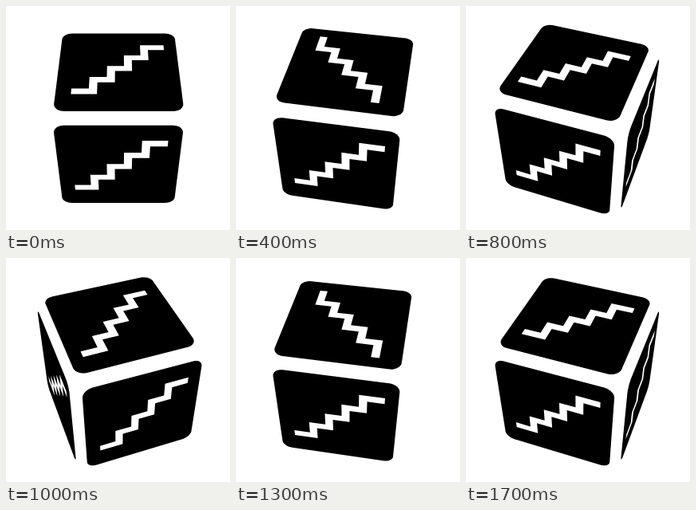
Recreate the animation shown at these times as an HTML page with a canvas. Size 281x281 px, loop 1.8 s.

```html
<!DOCTYPE html>
<html lang="en">
<head>
<meta charset="utf-8">
<title>Stair cube</title>
<style>
html, body { margin: 0; width: 100%; height: 100%; overflow: hidden; background: #fff; }
canvas { display: block; width: 100vw; height: 100vh; }
</style>
</head>
<body>
<canvas id="stage" width="281" height="281"></canvas>
<script>
const ctx = document.getElementById('stage').getContext('2d');

const STEP_MS = 100, STEPS = 18;
const CENTER_X = 141, CENTER_Y = 140.5;
const DISTANCE = 9.57, FOCAL = 654.6;
const TILT = Math.SQRT1_2;            // sine and cosine of the 45° camera pitch
const FACE_HALF = 1.008;
const FACE_OFFSET = 1.168;            // distance of each face from the cube's middle
const CORNER = 0.17;
const LID_SHIFT = [0.015, 0.013];     // the lid sits slightly off the axis,
const LID_AXIS_X = -0.012;            // which is itself a touch to the left

function project(x, y, z) {
  const up = TILT * (y - z);
  const scale = FOCAL / (DISTANCE - TILT * (y + z));
  return [CENTER_X + x * scale, CENTER_Y - up * scale];
}

function roundedSquare() {
  const points = [], inner = FACE_HALF - CORNER, arcSteps = 8;
  for (let corner = 0; corner < 4; corner++) {
    const middle = Math.PI * (0.25 + corner / 2);
    const cx = Math.sign(Math.cos(middle)) * inner;
    const cy = Math.sign(Math.sin(middle)) * inner;
    for (let i = 0; i <= arcSteps; i++) {
      const a = Math.PI / 2 * (corner + i / arcSteps);
      points.push([cx + CORNER * Math.cos(a), cy + CORNER * Math.sin(a)]);
    }
  }
  return points;
}

function staircase() {
  const step = 0.285, end = 0.775, half = 0.067;
  const shiftX = 0.016, shiftY = 0.02;
  const corners = [];
  for (let i = 0; i < 4; i++) {
    const s = (i - 1.5) * step;
    corners.push([s, (i - 2) * step], [s, (i - 1) * step]);
  }
  const side = k => [
    [-end, -2 * step + k],
    ...corners.map(([s, v]) => [s - k, v + k]),
    [end, 2 * step + k]
  ];
  return [...side(half), ...side(-half).reverse()]
    .map(([s, v]) => [s + shiftX, v + shiftY]);
}

const PANEL = roundedSquare();
const STAIRS = staircase();

function fillShape(points, place, color) {
  ctx.beginPath();
  for (const [s, v] of points) ctx.lineTo(...project(...place(s, v)));
  ctx.closePath();
  ctx.fillStyle = color;
  ctx.fill();
}

function drawFace(place) {
  fillShape(PANEL, place, '#000');
  fillShape(STAIRS, place, '#fff');
}

function drawCube(angle) {
  ctx.fillStyle = '#fff';
  ctx.fillRect(0, 0, 281, 281);

  for (let side = 0; side < 4; side++) {
    const a = angle + side * Math.PI / 2;
    const sin = Math.sin(a), cos = Math.cos(a);
    if (cos * TILT * DISTANCE < FACE_OFFSET + 0.02) continue;
    drawFace((s, v) => [FACE_OFFSET * sin + s * cos, v, FACE_OFFSET * cos - s * sin]);
  }

  const sin = Math.sin(angle), cos = Math.cos(angle);
  drawFace((s, v) => {
    const x = s + LID_SHIFT[0], z = LID_SHIFT[1] - v;
    return [LID_AXIS_X + x * cos + z * sin, FACE_OFFSET, z * cos - x * sin];
  });
}

function tick(now) {
  const step = Math.floor(Math.max(0, now) / STEP_MS) % STEPS;
  drawCube(step / STEPS * Math.PI * 2);
  requestAnimationFrame(tick);
}

drawCube(0);
requestAnimationFrame(tick);
</script>
</body>
</html>
```
